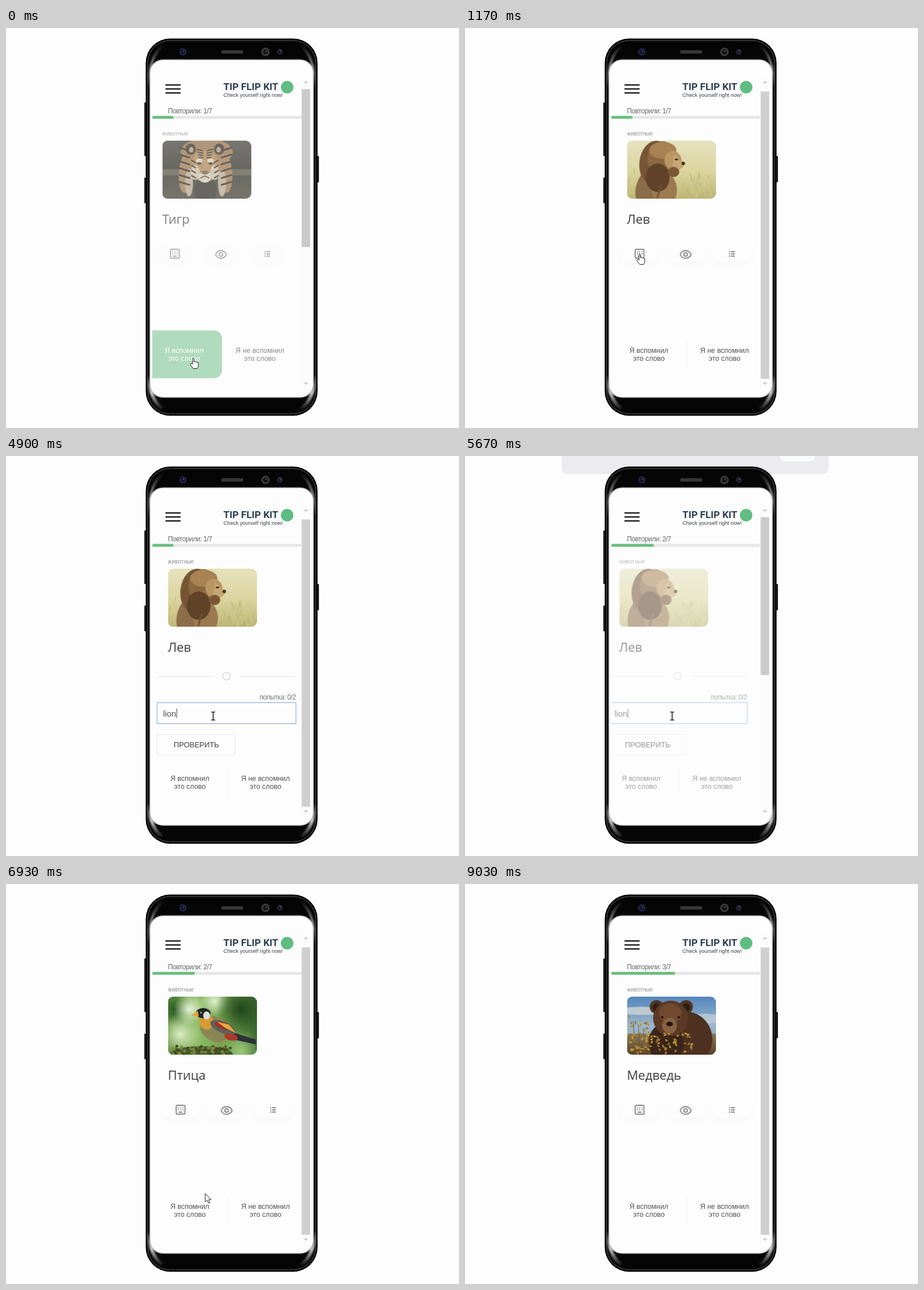
Recreate the animation shown at these times as an HTML page with a canvas. Size 796 by 703 pixels, loop 9.36 s.

```html
<!DOCTYPE html>
<html lang="ru">
<head>
<meta charset="utf-8">
<title>Карточки</title>
<style>
html, body { margin: 0; width: 100%; height: 100%; overflow: hidden; background: #fdfdfd; }
canvas { display: block; }
</style>
</head>
<body>
<canvas id="stage" width="796" height="703"></canvas>
<script>
const W = 796, H = 703, LOOP = 9360;
const SANS = '"Liberation Sans", Arial, sans-serif';
const GREEN = '#69be7e';
const ctx = document.getElementById('stage').getContext('2d');

function layer(w, h, paint) {
  const c = document.createElement('canvas');
  c.width = w; c.height = h;
  if (paint) paint(c.getContext('2d'));
  return c;
}

function rr(g, x, y, w, h, r, fill, stroke, lw = 1) {
  g.beginPath();
  g.roundRect(x, y, w, h, r);
  if (fill) { g.fillStyle = fill; g.fill(); }
  if (stroke) { g.strokeStyle = stroke; g.lineWidth = lw; g.stroke(); }
}

function blob(g, color, x, y, rx, ry = rx, rot = 0) {
  g.fillStyle = color;
  g.beginPath();
  g.ellipse(x, y, rx, ry, rot, 0, 7);
  g.fill();
}

function poly(g, color, ...p) {
  g.fillStyle = color;
  g.beginPath();
  for (let i = 0; i < p.length; i += 2) g.lineTo(p[i], p[i + 1]);
  g.fill();
}

function line(g, color, lw, ...p) {
  g.strokeStyle = color;
  g.lineWidth = lw;
  g.beginPath();
  for (let i = 0; i < p.length; i += 2) g.lineTo(p[i], p[i + 1]);
  g.stroke();
}

function text(g, s, x, y, size, color, { align = 'left', family = SANS, weight = '', gap = 0 } = {}) {
  g.font = `${weight} ${size}px ${family}`;
  g.letterSpacing = gap + 'px';
  g.textAlign = align;
  g.fillStyle = color;
  g.fillText(s, x, y);
}

function ramp(g, x0, y0, x1, y1, ...colors) {
  const r = g.createLinearGradient(x0, y0, x1, y1);
  colors.forEach((c, i) => r.addColorStop(i / (colors.length - 1), c));
  return r;
}

function glow(g, color, x, y, r) {
  const s = g.createRadialGradient(x, y, 0, x, y, r);
  s.addColorStop(0, color);
  s.addColorStop(1, color + '00');
  g.fillStyle = s;
  g.fillRect(x - r, y - r, 2 * r, 2 * r);
}

function random(seed) {
  return () => (seed = seed * 16807 % 2147483647) / 2147483647;
}

// Photos, 156 x 102
const PW = 156, PH = 102;
function photo(paint) {
  return layer(PW, PH, g => {
    g.beginPath();
    g.roundRect(0, 0, PW, PH, 9);
    g.clip();
    paint(g);
  });
}

const tiger = photo(g => {
  g.fillStyle = ramp(g, 0, 0, 0, PH, '#35332a', '#201e17', '#343222');
  g.fillRect(0, 0, PW, PH);
  rr(g, 0, 50, PW, 11, 0, '#45412f');
  blob(g, '#8a6539', 78, 20, 46, 24);
  for (const s of [-1, 1]) {
    blob(g, '#93693a', 76 + s * 34, 56, 13, 36, -s * .08);
    blob(g, '#b0a084', 76 + s * 29, 74, 7, 24);
    for (let i = 0; i < 6; i++)
      line(g, '#1d1812', 3, 76 + s * 47, 12 + i * 12, 76 + s * 27, 18 + i * 12);
  }
  blob(g, '#201c15', 76, 88, 20, 22);
  for (const s of [-1, 1]) {
    blob(g, '#211a13', 75 + s * 25, 15, 9, 10);
    blob(g, '#a28c66', 75 + s * 24, 16, 4, 5);
  }
  blob(g, '#a3763f', 75, 44, 24, 29);
  for (const s of [-1, 1]) {
    blob(g, '#c4b69a', 75 + s * 17, 56, 8, 13);
    blob(g, '#d0c3a9', 75 + s * 10, 35, 6, 4);
    blob(g, '#18130e', 75 + s * 10, 40, 3.5, 2);
    for (let i = 0; i < 4; i++) {
      line(g, '#1d1812', 2.2, 75 + s * 3, 18 + i * 4, 75 + s * (14 - i), 15 + i * 5);
      line(g, '#1d1812', 2.2, 75 + s * 24, 34 + i * 9, 75 + s * 16, 39 + i * 9);
    }
  }
  blob(g, '#a97b48', 75, 46, 6, 12);
  blob(g, '#cfc3aa', 75, 64, 11, 10);
  blob(g, '#694235', 75, 56, 6, 3.5);
  line(g, '#211a13', 1.5, 67, 66, 75, 62, 83, 66);
});

const lion = photo(g => {
  g.fillStyle = ramp(g, 0, 0, 0, PH, '#e5e2bd', '#ddd6a2', '#bdb775');
  g.fillRect(0, 0, PW, PH);
  const rnd = random(19);
  for (let i = 0; i < 90; i++) {
    const x = rnd() * PW, y = 58 + rnd() * 44;
    line(g, i % 2 ? '#d9d18f' : '#b3ac6d', .8, x, y, x + rnd() * 6 - 3, y - 10);
  }
  blob(g, '#8b6d49', 35, 83, 19, 33, .25);
  blob(g, '#9b7a50', 66, 87, 22, 30);
  blob(g, '#765536', 49, 39, 27, 39, .12);
  blob(g, '#8c6840', 62, 31, 26, 30);
  blob(g, '#604229', 54, 65, 21, 25);
  blob(g, '#a78354', 63, 17, 24, 15);
  blob(g, '#b99663', 81, 35, 15, 17, -.2);
  poly(g, '#c6a774', 83, 24, 92, 34, 102, 38, 100, 45, 91, 52, 79, 49);
  blob(g, '#42301f', 99, 40, 3, 3);
  blob(g, '#392a1c', 87, 33, 3, 1.5);
  blob(g, '#7a5836', 82, 55, 10, 9);
  line(g, '#6e5335', 3, 53, 101, 60, 79);
});

const bird = photo(g => {
  g.fillStyle = ramp(g, 0, 0, PW, 0, '#5d9140', '#8fbd66', '#6ea04c', '#3d6a31');
  g.fillRect(0, 0, PW, PH);
  glow(g, '#2c5a22', 12, 22, 32);
  glow(g, '#e6f3d6', 38, 22, 28);
  glow(g, '#dcedc4', 22, 66, 36);
  glow(g, '#e0efcf', 82, 8, 26);
  glow(g, '#22461d', 128, 22, 44);
  glow(g, '#9cc878', 128, 96, 36);
  blob(g, '#4a5a28', 59, 101, 55, 14);
  const rnd = random(7);
  for (let i = 0; i < 70; i++)
    blob(g, i % 2 ? '#7d8640' : '#3c4c22', 8 + rnd() * 102, 87 + rnd() * 15, 2.5);
  line(g, '#b99152', 2, 88, 74, 84, 88);
  line(g, '#b99152', 2, 97, 76, 99, 90);
  poly(g, '#2c3133', 104, 60, 154, 75, 155, 84, 119, 76);
  blob(g, '#8b8556', 82, 57, 27, 21, .55);
  blob(g, '#d99b36', 67, 43, 12, 15, -.2);
  blob(g, '#5c6256', 97, 54, 24, 10, .4);
  blob(g, '#a62f2c', 97, 51, 15, 6, .3);
  blob(g, '#ad392d', 111, 71, 12, 6, .2);
  poly(g, '#e0ad3d', 86, 44, 107, 49, 120, 64, 101, 55);
  blob(g, '#1d2422', 62, 29, 13, 9);
  blob(g, '#dde1df', 68, 33, 6, 7);
  poly(g, '#e5a43a', 53, 25, 41, 33, 54, 35);
  blob(g, '#f0e5cf', 58, 28, 1.3);
});

const bear = photo(g => {
  g.fillStyle = ramp(g, 0, 0, 0, PH, '#5487bd', '#9db7cc', '#809da6');
  g.fillRect(0, 0, PW, PH);
  blob(g, '#bdcad1', 27, 25, 47, 7);
  blob(g, '#b3c5d2', 137, 39, 31, 9);
  g.fillStyle = ramp(g, 0, 61, 0, PH, '#8c805c', '#5a4325');
  g.fillRect(0, 65, PW, 37);
  blob(g, '#4d3020', 102, 75, 48, 49, .2);
  blob(g, '#3b2519', 69, 81, 31, 35);
  for (const x of [52, 104]) {
    blob(g, '#51331f', x, 18, 12);
    blob(g, '#2d1e16', x, 19, 7);
  }
  blob(g, '#5b3924', 77, 38, 31, 31);
  blob(g, '#704a30', 76, 29, 20, 17);
  blob(g, '#876243', 75, 51, 13, 14);
  blob(g, '#201812', 75, 48, 6, 4);
  blob(g, '#17110d', 62, 36, 2);
  blob(g, '#17110d', 91, 36, 2);
  const rnd = random(31);
  for (let i = 0; i < 4; i++) line(g, '#76592c', 1, 15 + i * 8, 102, 11 + i * 9, 43 + i * 6);
  for (let i = 0; i < 85; i++) {
    const left = i % 2, x = left ? rnd() * 39 : 38 + rnd() * 78;
    blob(g, ['#cda53c', '#987433', '#b98b34'][i % 3], x, (left ? 34 : 64) + rnd() * (left ? 66 : 36), 2.7, 1.4, rnd() * 3);
  }
});

// Soft reflections that follow the corners of the glass
function bezelShine(g) {
  for (const side of [-1, 1]) {
    g.save();
    g.translate(396.75, 0);
    g.scale(side, 1);
    g.lineCap = 'round';
    g.filter = 'blur(1.5px)';
    g.strokeStyle = ramp(g, 0, 105, 0, 30, '#9990', '#a5a5a5', '#9990');
    g.lineWidth = 4;
    g.beginPath();
    g.moveTo(145.5, 105);
    g.quadraticCurveTo(146, 50, 122, 32);
    g.stroke();
    g.strokeStyle = ramp(g, 0, 610, 0, 672, '#bbb0', '#d5d5d5', '#bbb0');
    g.lineWidth = 6;
    g.beginPath();
    g.moveTo(145.5, 610);
    g.quadraticCurveTo(145, 650, 124, 668);
    g.stroke();
    g.restore();
  }
}

const phone = layer(W, H, g => {
  for (const [x, y, h] of [[243, 131, 94], [243, 263, 45], [546, 225, 46]]) rr(g, x, y, 4, h, 1, '#252525');
  rr(g, 245.5, 18.5, 302, 663, 43, '#050505');
  rr(g, 249, 22, 295, 656, 39.5, null, '#5c5c5c', 1);
  bezelShine(g);
  rr(g, 253, 56, 287, 593, 23, '#fdfdfd', '#c4c4c4', 1.5);
  rr(g, 378, 39, 39, 6, 3, '#363636');
  for (const [x, r, c] of [[311, 6.5, '#24214d'], [456, 7.5, '#3b3936'], [481, 5, '#29293c']]) {
    blob(g, c, x, 42, r);
    blob(g, '#11111d', x, 42, r * .58);
    blob(g, '#55536f', x + 1, 41, 1.3);
  }
  // Fixed app header
  for (const y of [99, 106, 113]) rr(g, 280, y, 27, 2.3, 1, '#111');
  text(g, 'TIP FLIP KIT', 382, 109, 17.2, '#2c3e50', { family: 'Roboto, sans-serif', weight: 'bold' });
  blob(g, '#5fbd82', 494, 104, 11);
  text(g, 'Check yourself right now!', 382, 121, 9.3, '#34404a');
});

// Card pieces
function modeIcons(g) {
  for (const x of [306.5, 387.5, 468.5]) {
    g.save();
    g.shadowColor = 'rgba(0,0,0,.025)';
    g.shadowBlur = 14;
    g.shadowOffsetY = 4;
    rr(g, x - 33, 382, 66, 30, 15, '#fdfdfd');
    g.restore();
  }
  const ink = '#858585';
  rr(g, 299, 389, 15.5, 15.5, 2, null, ink, 1.8);
  for (let i = 0; i < 6; i++) rr(g, 302 + i % 3 * 4, 392.5 + (i / 3 | 0) * 3.5, 1.8, 1.8, 0, ink);
  rr(g, 303.5, 400, 6.5, 2, 0, ink);
  g.strokeStyle = ink;
  g.lineWidth = 1.8;
  g.beginPath();
  g.moveTo(378, 398);
  g.bezierCurveTo(382, 389, 393, 389, 397.5, 398);
  g.bezierCurveTo(393, 407, 382, 407, 378, 398);
  g.stroke();
  g.beginPath();
  g.arc(387.7, 398, 3.2, 0, 7);
  g.stroke();
  for (let i = 0; i < 3; i++) {
    rr(g, 464, 392.2 + i * 3.8, 2, 2, 0, ink);
    rr(g, 467.5, 392.2 + i * 3.8, 6.5, 2, 0, ink);
  }
}

function answerForm(g, { focus, typed }) {
  line(g, '#e6e6ea', 1, 266, 387.5, 364, 387.5);
  line(g, '#e6e6ea', 1, 411, 387.5, 509, 387.5);
  rr(g, 381, 380.5, 13, 13, 6.5, null, '#d9d9dc', 1.6);
  text(g, 'попытка: 0/2', 509.5, 428, 12, '#777', { align: 'right', gap: -.45 });
  rr(g, 265.5, 433.5, 244, 37, 0, '#fdfdfd', focus ? '#7ba4d6' : '#dedede');
  if (typed) {
    text(g, typed, 276, 457.5, 14.8, '#555');
    const x = 277 + g.measureText(typed).width;
    line(g, '#333', 1, x, 444, x, 460);
  } else {
    text(g, 'Пишите здесь..', 276, 457.5, 14.8, '#999');
  }
  rr(g, 265.5, 489.5, 137, 36, 0, '#fdfdfd', '#ececec');
  text(g, 'ПРОВЕРИТЬ', 334.5, 512, 13, '#3c3c3c', { align: 'center' });
}

function drawCard(g, card) {
  text(g, 'животные', 284.5, 188.5, 10, '#929292');
  g.drawImage(card.photo, 284.5, 198);
  text(g, card.word, 284.5, 344, 22, '#3d3d3d', { family: '"Open Sans", "Noto Sans", sans-serif' });
  if (card.form) answerForm(g, card.form); else modeIcons(g);
  line(g, '#f3f3f3', 1, 389.5, 549, 389.5, 598);
  if (card.hover) rr(g, 240, 531.5, 149.5, 84, 14, '#8bcb9e');
  const answer = (s, x, color) => {
    text(g, s, x, 570.5, 12.4, color, { align: 'center' });
    text(g, 'это слово', x, 584.5, 12.4, color, { align: 'center' });
  };
  answer('Я вспомнил', 323, card.hover ? '#fff' : '#505050');
  answer('Я не вспомнил', 456, '#505050');
}

// Timing
const LEAVE = 680;
function ease(t) {
  let lo = 0, hi = 1, u = .5;
  for (let i = 0; i < 20; i++) {
    u = (lo + hi) / 2;
    const x = .75 * u * (1 - u) + u ** 3;
    if (x < t) lo = u; else hi = u;
  }
  return .3 * u * (1 - u) ** 2 + 3 * u * u * (1 - u) + u ** 3;
}

function cardAt(t) {
  if (t < 534) return { photo: tiger, word: 'Тигр', hover: true, start: -146, shown: 0 };
  if (t < 6166) {
    const typed = 'lion'.slice(0, [3230, 3870, 3950, 4030].filter(k => t >= k).length);
    return { photo: lion, word: 'Лев', form: t >= 1630 && { focus: t >= 3000, typed }, start: 5486, shown: 5530 };
  }
  if (t < 8055) return { photo: bird, word: 'Птица', hover: t >= 7000, start: 7375, shown: 7730 };
  return { photo: bear, word: 'Медведь', shown: Infinity };
}

const path = [
  [0, 329, 580], [270, 405, 486], [530, 392, 448], [870, 392, 448], [1170, 307, 397],
  [1630, 307, 397], [2030, 364, 457], [5750, 364, 457], [6270, 373, 468], [6600, 373, 468], [7100, 342, 571], [8055, 342, 571]
];

function pointerAt(t) {
  const i = path.findIndex(k => k[0] > t);
  if (i < 1) return null;
  const [t0, x0, y0] = path[i - 1], [t1, x1, y1] = path[i];
  let p = (t - t0) / (t1 - t0);
  if (t > 530) p = p * p * (3 - 2 * p);
  const kind = t < 80 || (t > 1100 && t < 1700) || t > 6990 ? 'hand' : t > 1950 && t < 5800 ? 'beam' : 'arrow';
  return { x: x0 + (x1 - x0) * p, y: y0 + (y1 - y0) * p, kind };
}

const shapes = {
  arrow: new Path2D('M0 0V15L3.5 11.7L6 17L8.3 16L6 10.8H10.5Z'),
  hand: new Path2D('M-1.2 1Q0-1 1.2 1V7Q3 5 4.2 7Q6 6 7 8Q9 7 9 10V13Q9 16 7 18.5H0Q-3 15-5 11.5Q-5 8-1.2 11Z'),
  beam: new Path2D('M-3.5-7H-1Q0-7 0-6Q0-7 1-7H3.5M0-6V6M-3.5 7H-1Q0 7 0 6Q0 7 1 7H3.5')
};

function drawPointer({ x, y, kind }) {
  ctx.save();
  ctx.translate(Math.round(x), Math.round(y));
  ctx.strokeStyle = '#222';
  ctx.lineWidth = kind === 'beam' ? 1.6 : 1;
  if (kind !== 'beam') {
    ctx.fillStyle = '#fff';
    ctx.fill(shapes[kind]);
  }
  ctx.stroke(shapes[kind]);
  ctx.restore();
}

function drawToast(t) {
  const p = (t - 5530) / 370;
  if (p <= 0 || p >= 1) return;
  const bottom = 34 * Math.sin(Math.PI * p);
  rr(ctx, 170, bottom - 70, 469, 70, 9, '#ececee');
  rr(ctx, 553, bottom - 52, 62, 30, 11, '#fafbfb');
}

const cardLayer = layer(W, H);
const cardCtx = cardLayer.getContext('2d');

function render(t) {
  const card = cardAt(t), leaving = t >= card.shown;
  const p = leaving ? ease(Math.min(1, (t - card.start) / LEAVE)) : 0;
  ctx.fillStyle = '#fdfdfd';
  ctx.fillRect(0, 0, W, H);
  drawToast(t);
  ctx.drawImage(phone, 0, 0);

  const done = t < 5530 ? 1 : t < 7730 ? 2 : 3;
  text(ctx, `Повторили: ${done}/7`, 284.5, 150, 12, '#686868', { gap: -.45 });
  rr(ctx, 257, 154.5, 262, 5, 2.5, '#e6e6e6');
  rr(ctx, 257, 154.5, 262 * done / 7, 5, 2.5, GREEN);

  cardCtx.clearRect(0, 0, W, H);
  drawCard(cardCtx, card);
  ctx.save();
  ctx.beginPath();
  ctx.rect(257, 160, 262, 470);
  ctx.clip();
  ctx.globalAlpha = 1 - p;
  ctx.drawImage(cardLayer, -30 * p, 0);
  ctx.restore();

  rr(ctx, 519.5, 88, 15, 542, 0, '#fcfcfc');
  if (leaving) rr(ctx, 519.5, 107.5, 15, 277.5, 0, '#cacaca');
  else rr(ctx, 519.5, 111.5, 15, 505, 0, '#cfcfcf');
  poly(ctx, '#c9c9c9', 523, 97, 527, 93, 531, 97);
  poly(ctx, '#c9c9c9', 523, 623, 527, 627, 531, 623);

  const pointer = pointerAt(t);
  if (pointer) drawPointer(pointer);
}

const began = performance.now();
function tick() {
  render((performance.now() - began) % LOOP);
  requestAnimationFrame(tick);
}
tick();
</script>
</body>
</html>
```
